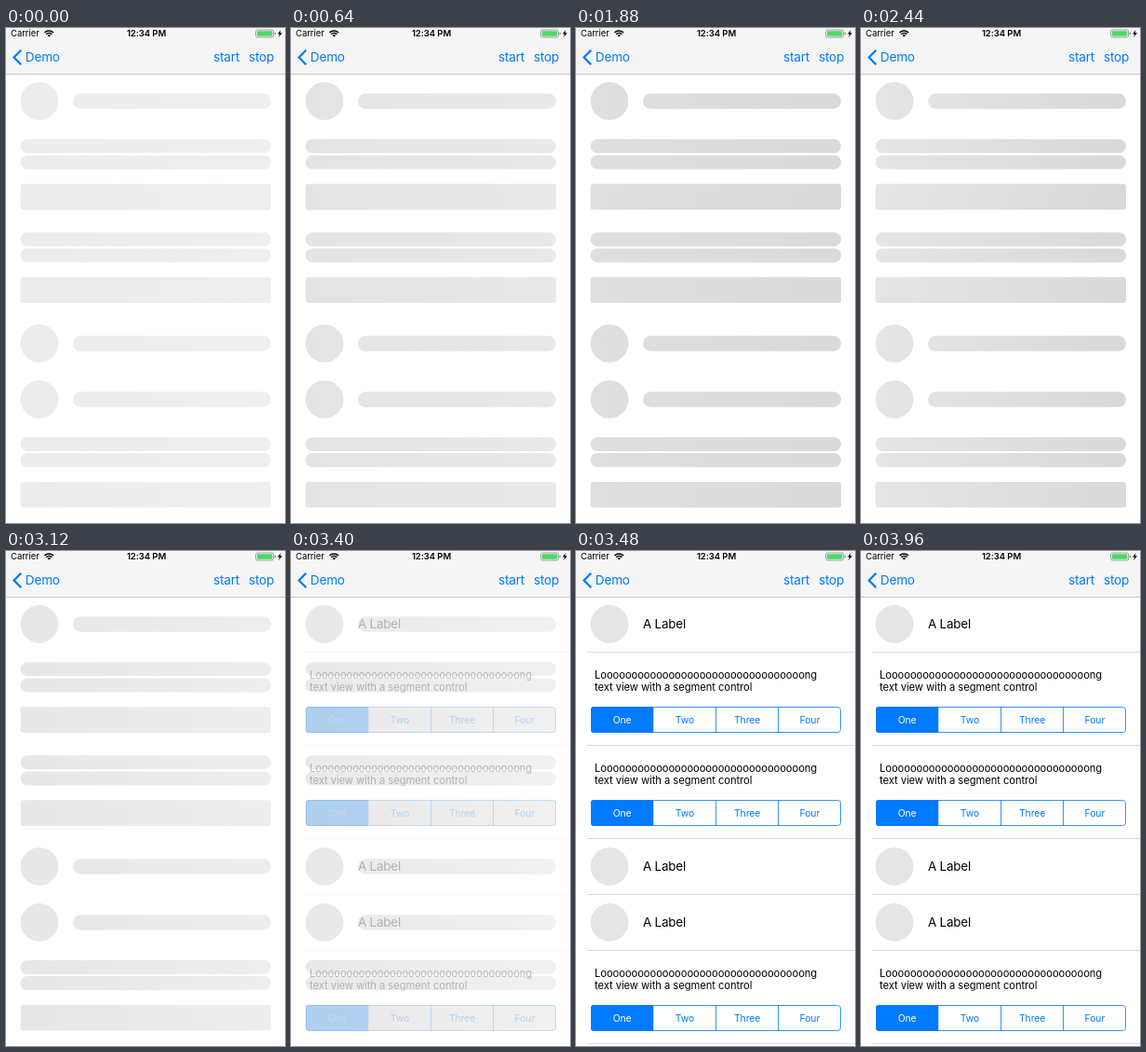
Write an HTML page with a canvas that moves like this. It is 300 by 531 pixels and loops after 4960 ms.

```html
<!DOCTYPE html>
<html lang="en">
<head>
<meta charset="utf-8">
<title>Skeleton list demo</title>
<style>
  html, body { margin: 0; width: 100%; height: 100%; overflow: hidden; background: #fff; }
  canvas { display: block; width: 100%; height: 100%; }
</style>
</head>
<body>
<canvas id="stage"></canvas>
<script>
const W = 300, H = 531, LOOP = 4960;
const FADE_START = 3280, REVEAL = 3480;
const BLUE = '#007aff';
const canvas = document.getElementById('stage');
const ctx = canvas.getContext('2d');
const dpr = window.devicePixelRatio || 1;
canvas.width = W * dpr;
canvas.height = H * dpr;

const rows = [
  { y: 49, kind: 'label' },
  { y: 109, kind: 'text' },
  { y: 209, kind: 'text' },
  { y: 309, kind: 'label' },
  { y: 369, kind: 'label' },
  { y: 428.7, kind: 'text' }
];
const LONG = 'L' + 'o'.repeat(33) + 'ng';
const SEGMENTS = ['One', 'Two', 'Three', 'Four'];

// Grey level at both ends of the shimmer: [time, level]
const leftKeys = [[0, 236], [1320, 220], [1480, 220], [2440, 229], [2780, 232], [3120, 231], [3480, 233]];
const rightKeys = [[0, 239], [1320, 226], [1480, 225], [2050, 216], [2440, 217], [3120, 238], [3480, 241]];

function sample(keys, t) {
  let i = 1;
  while (i < keys.length - 1 && t > keys[i][0]) i++;
  const [t0, a] = keys[i - 1], [t1, b] = keys[i];
  const k = Math.min(1, Math.max(0, (t - t0) / (t1 - t0)));
  return a + (b - a) * (0.5 - 0.5 * Math.cos(Math.PI * k));
}

const grey = v => `rgb(${Math.round(v)},${Math.round(v)},${Math.round(v)})`;

function text(str, x, y, size, color = '#000', align = 'left', weight = 400) {
  ctx.font = `${weight} ${size}px Inter, "Liberation Sans", sans-serif`;
  ctx.letterSpacing = `${(size < 12 ? -0.005 : -0.015) * size}px`;
  ctx.textAlign = align;
  ctx.fillStyle = color;
  ctx.fillText(str, x, y);
}

function roundBox(x, y, w, h, r) {
  ctx.beginPath();
  ctx.roundRect(x, y, w, h, r);
}

function pill(x, y, w, h, r = h / 2) {
  roundBox(x, y, w, h, r);
  ctx.fill();
}

function disc(x, y, r) {
  ctx.beginPath();
  ctx.arc(x, y, r, 0, Math.PI * 2);
  ctx.fill();
}

function polyline(points) {
  ctx.beginPath();
  points.forEach(([x, y]) => ctx.lineTo(x, y));
}

function drawWifi(x, y) {
  const from = -Math.PI * 0.76, to = -Math.PI * 0.24;
  ctx.fillStyle = ctx.strokeStyle = '#000';
  ctx.lineWidth = 1.4;
  for (const r of [4.2, 6.6]) {
    ctx.beginPath();
    ctx.arc(x, y, r, from, to);
    ctx.stroke();
  }
  ctx.beginPath();
  ctx.moveTo(x, y);
  ctx.arc(x, y, 2.4, from, to);
  ctx.fill();
}

function drawBattery() {
  ctx.strokeStyle = '#8a8a8a';
  ctx.lineWidth = 0.8;
  roundBox(268.6, 2, 19, 8, 1.8);
  ctx.stroke();
  ctx.fillStyle = '#4cd964';
  pill(269.9, 3.3, 16.4, 5.4, 0.8);
  ctx.fillStyle = '#8a8a8a';
  pill(288.6, 4.6, 1.2, 2.8, 0.6);
  ctx.fillStyle = '#000';
  polyline([[295.6, 2], [292, 6.6], [294.2, 6.6], [293, 10], [297, 5.2], [294.7, 5.2]]);
  ctx.fill();
}

function drawBars() {
  ctx.fillStyle = '#f5f5f5';
  ctx.fillRect(0, 0, W, 49);
  ctx.fillStyle = '#b9b9b9';
  ctx.fillRect(0, 49, W, 0.8);
  text('Carrier', 5, 9.4, 9.5);
  drawWifi(46.3, 9.6);
  text('12:34 PM', 151, 9.4, 9.5, '#000', 'center', 600);
  drawBattery();

  ctx.strokeStyle = BLUE;
  ctx.lineWidth = 2.3;
  polyline([[16.2, 23.8], [8.6, 31.5], [16.2, 39.2]]);
  ctx.stroke();
  text('Demo', 20.8, 36.4, 13.6, BLUE);
  text('start', 223, 36.4, 13.6, BLUE);
  text('stop', 261, 36.4, 13.6, BLUE);
}

function drawSkeleton(t) {
  const shade = ctx.createLinearGradient(16, 0, 285, 0);
  shade.addColorStop(0, grey(sample(leftKeys, t)));
  shade.addColorStop(1, grey(sample(rightKeys, t)));
  ctx.fillStyle = shade;
  for (const { y, kind } of rows) {
    if (kind === 'label') {
      disc(36, y + 29.4, 20.4);
      pill(72, y + 21.2, 213, 16.6);
    } else {
      pill(15.6, y + 10.3, 269.4, 15);
      pill(15.6, y + 27.4, 269.4, 15);
      pill(15.6, y + 58.3, 269.4, 27.6, 3);
    }
  }
}

function drawSegments(y) {
  const x = 16, w = 269, h = 28, step = w / 4;
  ctx.fillStyle = BLUE;
  pill(x, y, step, h, [3, 0, 0, 3]);
  ctx.strokeStyle = BLUE;
  ctx.lineWidth = 0.8;
  roundBox(x + 0.5, y + 0.5, w - 1, h - 1, 3);
  ctx.stroke();
  SEGMENTS.forEach((name, i) => {
    const left = x + step * i;
    if (i > 1) {
      const edge = Math.floor(left) + 0.5;
      polyline([[edge, y], [edge, y + h]]);
      ctx.stroke();
    }
    text(name, left + step / 2, y + 17.7, 10.4, i ? BLUE : '#fff', 'center');
  });
}

function drawContent(alpha) {
  ctx.globalAlpha = alpha;
  for (const { y, kind } of rows) {
    if (kind === 'label') {
      ctx.fillStyle = '#e5e5e5';
      disc(36, y + 29.4, 20.4);
      text('A Label', 72, y + 34.4, 13.4);
    } else {
      ctx.save();
      ctx.beginPath();
      ctx.rect(15, y + 10, 271, 33);
      ctx.clip();
      text(LONG, 20, y + 27.8, 11.2);
      text('text view with a segment control', 20, y + 41.4, 11.2);
      ctx.restore();
      drawSegments(Math.floor(y + 58.4));
    }
    const height = kind === 'label' ? 60 : 100;
    ctx.fillStyle = '#d2d2d5';
    ctx.fillRect(12, Math.round(y + height) - 1, W - 12, 0.8);
  }
  ctx.globalAlpha = 1;
}

function draw(now) {
  const t = now % LOOP;
  ctx.setTransform(dpr, 0, 0, dpr, 0, 0);
  ctx.fillStyle = '#fff';
  ctx.fillRect(0, 0, W, H);
  if (t < REVEAL) {
    drawSkeleton(t);
    if (t >= FADE_START) drawContent(0.06 + 0.24 * (t - FADE_START) / 160);
  } else {
    drawContent(1);
  }
  drawBars();
  requestAnimationFrame(draw);
}

requestAnimationFrame(draw);
</script>
</body>
</html>
```
